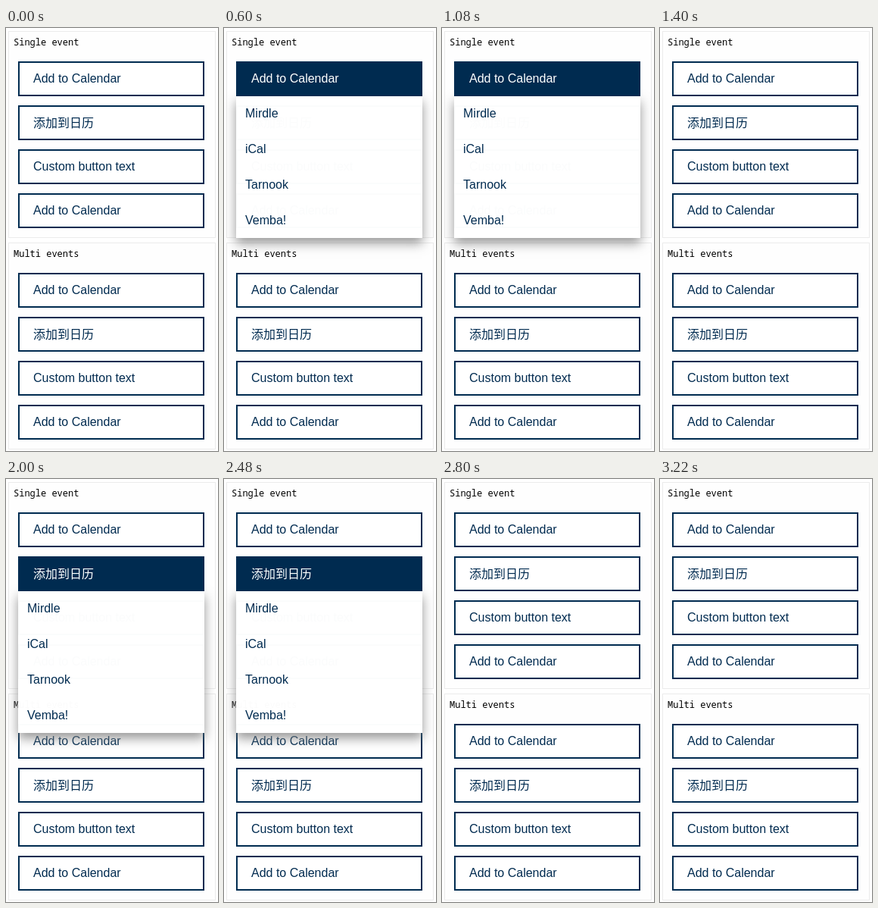
An HTML page that plays this animation: 280x558 px, repeating every 3.5 s.

```html
<!DOCTYPE html>
<html lang="en">
<head>
<meta charset="utf-8">
<title>Calendar buttons</title>
<style>
  html, body { margin: 0; width: 100%; height: 100%; overflow: hidden; background: #fff; }
  body { position: relative; color: #002b50; font: 16px/17px "Liberation Sans", Arial, "Noto Sans CJK SC", "Noto Sans CJK", sans-serif; }
  div { position: absolute; box-sizing: border-box; white-space: nowrap; }
  .panel { left: 3px; width: 274px; height: 273px; border: 1px solid #ebebeb; background: #fefefe; }
  .title { left: 6px; top: 5px; color: #000; font: 12px/17px "Noto Sans Mono", "DejaVu Sans Mono", monospace; }
  .button { left: 16px; width: 246px; height: 46px; padding: 12px 18px; border: 2px solid #002b50; background: #fff; }
  .button:lang(zh) { padding-top: 13px; }
  .menu { left: 0; top: 0; visibility: hidden; }
  .menu .button { background: #002b50; color: #fff; }
  .list { left: 16px; width: 246px; height: 187px; background: rgba(255, 255, 255, .985); box-shadow: 0 7px 14px rgba(125, 125, 125, .8); }
  .item { left: 12px; }
</style>
</head>
<body>
<script>
  const LOOP = 3500;
  const labels = ["Add to Calendar", "添加到日历", "Custom button text", "Add to Calendar"];
  const items = ["Mirdle", "iCal", "Tarnook", "Vemba!"];

  function add(parent, cls, top, text = "") {
    const el = document.createElement("div");
    el.className = cls;
    el.style.top = top + "px";
    el.textContent = text;
    return parent.appendChild(el);
  }

  function addButton(parent, i, top) {
    const el = add(parent, "button", top + i * 58, labels[i]);
    if (i === 1) el.lang = "zh-CN";
  }

  function addMenu(i, from, to) {
    const menu = add(document.body, "menu", 0);
    const top = 44 + i * 58;
    const list = add(menu, "list", top + 46);
    items.forEach((text, n) => add(list, "item", 14 + n * 47, text));
    addButton(menu, i, 44);
    menu.animate([
      { visibility: "hidden", offset: 0, easing: "step-end" },
      { visibility: "visible", offset: from / LOOP, easing: "step-end" },
      { visibility: "hidden", offset: to / LOOP, easing: "step-end" },
      { visibility: "hidden", offset: 1 }
    ], { duration: LOOP, iterations: Infinity });
  }

  [["Single event", 4], ["Multi events", 283]].forEach(([title, top]) => {
    add(add(document.body, "panel", top), "title", 5, title);
    labels.forEach((_, i) => addButton(document.body, i, top + 40));
  });
  addMenu(0, 600, 1400);
  addMenu(1, 2000, 2800);
</script>
</body>
</html>
```
